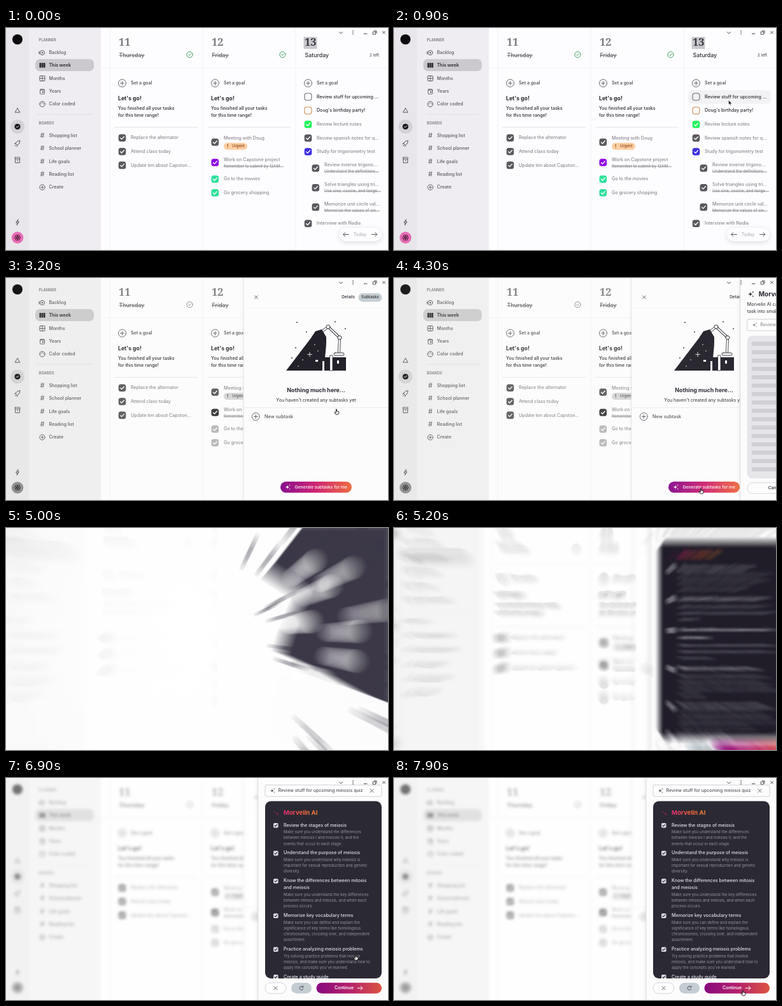
An HTML page with a canvas for the animation above (8 s loop, 600 by 350 pixels).

```html
<!DOCTYPE html>
<html lang="en">
<head>
<meta charset="utf-8">
<title>Weekly planner</title>
<style>
html, body { margin: 0; width: 100%; height: 100%; overflow: hidden; background: #fff; }
canvas { display: block; }
</style>
</head>
<body>
<canvas id="view" width="600" height="350"></canvas>
<script>
const W = 600, H = 350, LOOP = 8000;
const SANS = 'Inter, sans-serif', SERIF = '"Noto Serif", serif';
const INK = '#2b2930', SOFT = '#57555c', DONE = '#89878e', FAINT = '#f2f1f5';
const BRAND = 'Morvelin AI', TASK = 'Review stuff for upcoming meiosis quiz';

const view = document.getElementById('view').getContext('2d');
const layer = () => Object.assign(document.createElement('canvas'), { width: W, height: H }).getContext('2d');
const page = layer(), back = layer(), scene = layer(), soft = layer();
let c = page; // context being drawn on

const seg = (t, start, length) => Math.min(1, Math.max(0, (t - start) / length));
const easeOut = u => 1 - (1 - u) ** 3;
const easeBoth = u => u * u * (3 - 2 * u);
const random = i => Math.abs(Math.sin(i * 78.233) * 43758.5453) % 1;

// ---------- drawing helpers ----------
function text(s, x, y, size = 7.1, color = INK, weight = 500, font = SANS, align = 'left') {
  c.font = `${weight} ${size}px ${font}`;
  c.fillStyle = color;
  c.textAlign = align;
  c.textBaseline = 'middle';
  c.fillText(s, x, y);
  return c.measureText(s).width;
}
const centered = (s, x, y, size, color, weight) => text(s, x, y, size, color, weight, SANS, 'center');

function paint(fill, stroke, width = 1) {
  if (fill) { c.fillStyle = fill; c.fill(); }
  if (stroke) { c.strokeStyle = stroke; c.lineWidth = width; c.stroke(); }
}
function box(x, y, w, h, r, fill, stroke, width) {
  c.beginPath();
  c.roundRect(x, y, w, h, r);
  paint(fill, stroke, width);
}
function dot(x, y, r, fill, stroke, width) {
  c.beginPath();
  c.arc(x, y, r, 0, 7);
  paint(fill, stroke, width);
}
function trace(pts) {
  c.beginPath();
  for (let i = 0; i < pts.length; i += 2) c.lineTo(pts[i], pts[i + 1]);
}
function line(color, width, ...pts) {
  trace(pts);
  c.lineCap = c.lineJoin = 'round';
  paint(null, color, width);
}
function shape(fill, ...pts) {
  trace(pts);
  c.closePath();
  paint(fill);
}
function struck(s, x, y, size, color) {
  const w = text(s, x, y, size, color);
  line(color, .7, x, y + .4, x + w, y + .4);
}
function fade(x0, x1, ...colors) {
  const g = c.createLinearGradient(x0, 0, x1, 0);
  colors.forEach((k, i) => g.addColorStop(i / (colors.length - 1), k));
  return g;
}
function at(x, y, draw) {
  c.save();
  c.translate(x, y);
  draw();
  c.restore();
}

// ---------- icons ----------
function cross(x, y, r = 2.5, color = SOFT) {
  line(color, .9, x - r, y - r, x + r, y + r);
  line(color, .9, x - r, y + r, x + r, y - r);
}
function plus(x, y, r = 6) {
  dot(x, y, r, null, SOFT, .9);
  line(SOFT, .9, x - r / 2, y, x + r / 2, y);
  line(SOFT, .9, x, y - r / 2, x, y + r / 2);
}
function tick(x, y, k, color, width = 1.3) {
  line(color, width, x - 2.8 * k, y + .2 * k, x - .8 * k, y + 2.2 * k, x + 3 * k, y - 2 * k);
}
function check(x, y, color) {
  box(x - 5.8, y - 5.8, 11.6, 11.6, 3.5, color);
  tick(x, y, 1, '#fff');
}
function arrow(x, y, r, dir, color) {
  line(color, 1, x - r, y, x + r, y);
  line(color, 1, x + dir * (r - 3), y - 3, x + dir * r, y, x + dir * (r - 3), y + 3);
}
function spark(x, y, r, color) {
  for (const [dx, dy, k] of [[0, 0, r], [r, -r * .8, r * .4], [r, r * .8, r * .4]]) {
    c.beginPath();
    c.moveTo(x + dx, y + dy - k);
    for (let i = 1; i < 5; i++) {
      const a = i * Math.PI / 2;
      c.quadraticCurveTo(x + dx, y + dy, x + dx + k * Math.sin(a), y + dy - k * Math.cos(a));
    }
    paint(color);
  }
}
function calendar(x, y) {
  box(x - 3.5, y - 3.5, 7, 7.5, 1, null, SOFT, .9);
  line(SOFT, 1.2, x - 3, y - 2, x + 3, y - 2);
  box(x, y, 2, 2, 0, SOFT);
}

// ---------- planner page ----------
function rail() {
  box(0, 0, 36, H, 0, '#e8e6ea');
  dot(18, 18, 8, '#0b0a0d');
  dot(18, 155.5, 11, '#d3d1d6');
  line(SOFT, 1, 18, 126.5, 22, 133, 14, 133, 18, 126.5);
  dot(18, 155.5, 4.6, '#18171a');
  tick(18, 155.5, .65, '#fff', 1);
  line(SOFT, 1, 15, 182, 18, 178.5, 22, 177.5, 21, 182, 17.5, 185, 15, 182);
  line(SOFT, 1, 15, 181, 13.5, 183);
  line(SOFT, 1, 18, 185, 17, 187);
  line(SOFT, 1, 14, 186, 15.5, 184.5);
  box(14, 204, 8, 2.5, .5, null, SOFT, 1);
  box(14.5, 206.5, 7, 6, .5, null, SOFT, 1);
  line(SOFT, 1, 17, 209, 19, 209);
  line(SOFT, 1, 19, 302, 15.5, 307, 18, 307, 17, 311, 20.5, 305.5, 18, 305.5, 19, 302);
  dot(18, 330.5, 9.3, '#e76cb4');
  for (let i = 0; i < 6; i++)
    dot(18 + 3 * Math.cos(i * Math.PI / 3), 330.5 + 3 * Math.sin(i * Math.PI / 3), 1.6, null, '#4a1835', .9);
  dot(18, 330.5, 1.2, null, '#4a1835', .8);
}
function sidebar() {
  box(36, 0, 113, H, 0, '#efedf1');
  box(46, 49, 92, 19, 7, '#cbc9ce');
  line('#dfdde2', 1, 50, 136, 134, 136);
  text('PLANNER', 51.5, 19, 5.8, '#7b7980', 600);
  text('BOARDS', 51.5, 150, 5.8, '#7b7980', 600);
  ['Backlog', 'This week', 'Months', 'Years', 'Color coded'].forEach((s, i) =>
    text(s, 67.5, 39 + i * 20.3, 7, i == 1 ? INK : SOFT, i == 1 ? 600 : 500));
  ['Shopping list', 'School planner', 'Life goals', 'Reading list', 'Create'].forEach((s, i) => {
    text(s, 67.5, 170 + i * 20.3, 7.1, SOFT);
    if (i < 4) centered('#', 57, 170 + i * 20.3, 10.5, SOFT, 400);
  });
  dot(57, 39, 3.6, null, SOFT, 1);
  dot(57, 39, 1.2, SOFT);
  line(SOFT, 1, 52, 37, 52, 41);
  for (let i = 0; i < 3; i++) box(52.5 + i * 3.2, 55, 2.7, 7.5, .6, INK);
  box(53, 75.5, 8, 8, 1, null, SOFT, 1);
  line(SOFT, .9, 53, 79.5, 61, 79.5);
  line(SOFT, .9, 57, 75.5, 57, 83.5);
  calendar(57, 100);
  dot(57, 120, 4.2, null, SOFT, 1);
  for (const [x, y] of [[55, 119.5], [57, 117.8], [59, 119.5]]) dot(x, y, .7, SOFT);
  plus(57, 251.2, 4.2);
}
function dayHead(x, date, day) {
  text(date, x, 23, 16.5, '#7b7980', 700, SERIF);
  struck(day, x + .5, 43, 8.8, '#5f5d64');
  dot(x + 111.5, 42, 4.6, null, '#3f9d62', 1);
  tick(x + 111.5, 42, .65, '#3f9d62', 1);
}
function allDone(x) {
  text("Let's go!", x, 111, 8.7, INK, 700);
  text('You finished all your tasks', x, 127, 7.1);
  text('for this time range!', x, 138, 7.1);
  line('#e6e4e9', 1, x - 6, 156.5, x + 125, 156.5);
}
function planner(hover) {
  c = page;
  box(0, 0, W, H, 0, '#fdfcfe');
  rail();
  sidebar();
  for (const x of [163, 309, 455]) line(FAINT, 1, x, 0, x, H);
  line(FAINT, 1, 149, 63, W, 63);
  dayHead(177, '11', 'Thursday');
  dayHead(323, '12', 'Friday');
  box(467.5, 14, 21, 19, 1, '#c9c8cc');
  text('13', 469, 23, 16.5, '#3a3840', 700, SERIF);
  text('Saturday', 469.5, 43, 8.8);
  text('2 left', 571, 43, 6.3, SOFT);
  for (const x of [182.5, 328.5, 474.5]) {
    plus(x, 87);
    text('Set a goal', x + 13.5, 87, 7, SOFT, 600);
  }
  allDone(176);
  allDone(322);

  ['Replace the alternator', 'Attend class today', 'Update tim about Capston...'].forEach((s, i) => {
    check(182.5, 173.2 + i * 21.6, '#5a585e');
    text(s, 196, 173.2 + i * 21.6, 7.1, DONE);
  });

  check(328.3, 180, '#5a585e');
  text('Meeting with Doug', 342, 173.5, 7.1, DONE);
  box(342, 181, 37, 11, 5.5, '#fdcfa4');
  text('!', 347, 186.5, 7, '#8a4410', 700);
  text('Urgent', 355, 186.5, 6.1, '#8a4410');
  check(328.3, 212, '#9106e6');
  text('Work on Capstone project', 342, 208, 7.1, DONE);
  struck('Remember to submit by 12AM...', 342, 217.8, 6.2, DONE);
  check(328.3, 238.3, '#2fe09b');
  text('Go to the movies', 342, 238.3, 7.1, DONE);
  check(328.3, 259.8, '#2fe09b');
  text('Go grocery shopping', 342, 259.8, 7.1, DONE);

  c.globalAlpha = hover;
  box(462, 98, 130, 21.5, 6, '#f2f1f4');
  c.globalAlpha = 1;
  box(469, 103, 11, 11, 3.5, null, '#6b6970', 1.1);
  text('Review stuff for upcoming ...', 488, 108.5, 7.1);
  box(469, 124.7, 11, 11, 3.5, null, '#d08a4e', 1.1);
  text("Doug's birthday party!", 488, 130, 7.1);
  [['Review lecture notes', 152, '#1df45c'], ['Review spanish notes for q...', 173.5, '#5a585e'],
   ['Study for trigonometry test', 195, '#3c30e2'], ['Interview with Nadia', 308.3, '#5a585e']].forEach(([s, y, k]) => {
    check(474.5, y, k);
    text(s, 488, y, 7.1, DONE);
  });
  [['Review inverse trigono...', 'Understand the definitions...'], ['Solve triangles using tri...', 'Use sine, cosine, and tange...'],
   ['Memorize unit circle val...', 'Memorize the values of sin...']].forEach(([s, note], i) => {
    const y = 221 + i * 30.7;
    check(486.3, y, '#5a585e');
    text(s, 500, y - 4.7, 7.1, DONE);
    struck(note, 500, y + 5.3, 6.3, DONE);
  });

  c.shadowColor = '#0002';
  c.shadowBlur = 8;
  c.shadowOffsetY = 2;
  box(523, 315, 67, 21, 10.5, '#fdfcfe');
  c.shadowColor = 'transparent';
  arrow(534, 325.5, 4.3, -1, SOFT);
  arrow(578.5, 325.5, 4.3, 1, SOFT);
  centered('Today', 556, 325.5, 7, '#b5b3b9');
}

// ---------- task drawer ----------
function details() {
  ['Review stuff for ', 'upcoming meiosis ', 'quiz'].forEach((s, i) => {
    const y = 75 + i * 26.6, w = text(s, 388, y, 17.6, '#3a383f', 600, SERIF);
    line('#3a383f', 1.3, 388, y + 7, 388 + w, y + 7);
  });
  ['#f0982f', '#d6324e', '#7b6664', '#c9155f', '#8b14c8', '#4458d8', '#1fc98a', '#58df6b', '#e3e2e6'].forEach((k, i) => {
    dot(392.5 + i * 10.9, 147.3, 4.4, k, i == 8 ? '#8d8b92' : '#0002', .8);
    if (i == 6) dot(392.5 + i * 10.9, 147.3, 2.4, null, '#0a5c3e', .8);
    if (i == 8) dot(479.7, 147.3, 1.8, null, '#8d8b92', .8);
  });
  box(387.5, 163.5, 199, 24, 8, '#e8e7ea');
  text('Click to add description', 395, 175.5, 7.1, '#929097', 400);
  box(387.5, 196, 199, 25, 8, '#e8e7ea');
  calendar(400, 208.3);
  text('Saturday, May 13, 2023, 5:09 PM', 409.5, 208.3, 7);
  cross(571.5, 208.3);
  box(387.5, 228.5, 199, 105.5, 8, '#e8e7ea');
  ['Incomplete', 'Unpinned', 'Delete', 'Reschedule'].forEach((s, i) => {
    const y = 243 + i * 25.5, x = 403.7;
    dot(x, y, 9, '#ecebee', '#cfced3', .8);
    text(s, 420.5, y, 7.1, '#434148');
    if (i == 0) cross(x, y, 2.7, INK);
    if (i == 1) {
      box(x - 1.6, y - 4, 3.2, 4.5, .5, null, INK, 1);
      line(INK, 1, x - 3, y + .7, x + 3, y + .7);
      line(INK, 1, x, y + 1, x, y + 4);
    }
    if (i == 2) {
      box(x - 2.7, y - 2.2, 5.4, 6, .8, null, INK, 1);
      line(INK, 1, x - 3.5, y - 3.5, x + 3.5, y - 3.5);
      line(INK, .8, x - 1, y - .5, x - 1, y + 2);
      line(INK, .8, x + 1, y - .5, x + 1, y + 2);
    }
    if (i == 3) {
      dot(x, y, 4.2, null, INK, 1);
      line(INK, 1, x, y - 2.4, x, y, x + 1.6, y + 1.4);
    }
  });
  box(387.5, 345, 101, 16, 7, '#dfdee2');
  text('Created a few minutes ago', 394, 352.3, 6.6, SOFT);
}
function lamp() {
  const dark = '#232129';
  shape(dark, 440, 146, 481, 92, 503, 105, 501, 126, 481, 146);
  box(481, 125, 53, 21, 0, dark);
  box(497, 131, 3, 15, 0, '#fff');
  box(509, 122, 4, 24, 0, '#fff', dark, .8);
  box(486, 129, 4, 3, 0, '#fff');
  box(520, 130, 3, 5, 0, '#fff');
  for (const [k, w] of [[dark, 4], ['#fff', 2.4]]) line(k, w, 489, 90, 506, 77, 524, 94, 523, 119);
  shape(dark, 480, 93, 486, 84, 496, 81, 503, 93, 503, 105);
  for (const [x, y] of [[506, 77], [524, 94]]) dot(x, y, 3, '#fff', dark, .9);
  box(515, 118, 16, 4, 2, '#fff', dark, .9);
  for (const [x, y] of [[457, 70], [472, 85], [517, 69], [455, 110], [533, 80], [449, 126]]) dot(x, y, .9, dark);
  for (const [x, y] of [[485, 105], [466, 129], [459, 139], [490, 115]]) dot(x, y, .8, '#fff');
  line('#fff', .8, 477, 117, 477, 124);
  line('#fff', .8, 473.5, 120.5, 480.5, 120.5);
}
function subtasks() {
  lamp();
  centered('Nothing much here...', 487, 177, 8.9, INK, 700);
  centered("You haven't created any subtasks yet", 487, 192.5, 7.1, INK, 400);
  line('#ebeaee', 1, 373, 204.5, W, 204.5);
  plus(392.3, 218.5);
  text('New subtask', 406, 218.5, 7.3, SOFT);
  box(431, 321, 112, 17.5, 8.7, fade(431, 543, '#870f8e', '#cf2673', '#ee6c3f'));
  spark(442, 329.7, 3.6, '#fff');
  text('Generate subtasks for me', 453.5, 329.8, 6.7, '#fff');
}
function taskDrawer(t) {
  const tab = seg(t, 2850, 150);
  c.shadowColor = '#0001';
  c.shadowBlur = 6;
  box(373, 0, 240, H, 0, '#fdfcfd');
  c.shadowColor = 'transparent';
  line('#e3e2e6', 1, 373, 0, 373, H);
  cross(393, 30.3);
  if (tab) box(553.5, 24, 37, 13.5, 6.7, '#c6cfd3');
  else box(523, 24, 29, 13.5, 6.7, '#c6cfd3');
  centered('Details', 537.5, 30.5, 6.3, INK, 500);
  centered('Subtasks', 572, 30.5, 6.3, INK, 500);
  line('#f3f2f5', 1, 373, 47.5, W, 47.5);
  c.globalAlpha = tab || 1;
  if (tab) subtasks(); else details();
  c.globalAlpha = 1;
}

// ---------- assistant drawer ----------
const STEPS = [
  [74.5, ['Review the stages of meiosis'], ['Make sure you understand the differences', 'between meiosis I and meiosis II, and the', 'events that occur in each stage.']],
  [118.3, ['Understand the purpose of meiosis'], ['Make sure you understand why meiosis is', 'important for sexual reproduction and genetic', 'diversity.']],
  [162.2, ['Know the differences between mitosis', 'and meiosis'], ['Make sure you understand the key differences', 'between mitosis and meiosis, and when each', 'process occurs.']],
  [217, ['Memorize key vocabulary terms'], ['Make sure you can define and explain the', 'significance of key terms like homologous', 'chromosomes, crossing over, and independent', 'assortment.']],
  [270, ['Practice analyzing meiosis problems'], ['Try solving practice problems that involve', 'meiosis, and make sure you understand how to', "apply the concepts you've learned."]],
  [313.6, ['Create a study guide'], []],
];
function field(y, color) {
  box(407, y - 9, 183, 18, 2, '#fefefe', '#cfced3', 1);
  spark(418, y, 3.5, color);
  text(TASK, 427.5, y + .2, 7.1, color);
  cross(574.5, y, 2.7);
}
function loading() {
  spark(412, 25.5, 4.2, INK);
  text(BRAND, 425, 25.5, 10, INK, 700);
  text(BRAND + ' can help you break down your', 407, 42, 7.1, INK, 400);
  text('task into smaller, easier subtasks', 407, 52.5, 7.1, INK, 400);
  field(74, '#929097');
  box(407, 91, 183, 225, 8, '#e6e5e9');
  for (let i = 0; i < 16; i++) box(414, 100.5 + i * 13.2, 169, 6.5, 2, '#d0cfd4');
  box(407, 322.8, 88, 17, 8.5, null, '#d3d2d7', 1);
  centered('Cancel', 451, 331.3, 6.7);
  box(502, 322.8, 88, 17, 8.5, '#dddce0');
  centered('Generate', 546, 331.3, 6.7, '#a3a1a8');
}
function answer() {
  field(20, SOFT);
  c.save();
  box(407, 36.5, 183, 279.5, 9, '#2b2933');
  c.clip();
  line('#a0255e', 1, 421, 52.5, 427, 58.5, 427, 54.5);
  text(BRAND, 436, 55.5, 9.6, fade(436, 492, '#e22b76', '#f0603c', '#f0862f'), 700);
  for (const [y, title, notes] of STEPS) {
    box(420, y - 3.5, 7.6, 7.6, 1.8, '#dcdae2');
    tick(423.8, y + .2, .7, '#2b2933', 1.1);
    title.forEach((s, i) => text(s, 436, y + i * 10.8, 7.15, '#e6e4eb'));
    const top = y + title.length * 10.8;
    notes.forEach((s, i) => text(s, 436, top + i * 9.2, 6.1, '#9794a0', 400));
  }
  c.restore();
  box(407, 322.8, 33, 17, 8.5, '#fefefe', '#d3d2d7', 1);
  cross(423.5, 331.3, 2.7);
  box(448, 322.8, 32, 17, 8.5, '#c3cdd2');
  c.beginPath();
  c.arc(464, 331.3, 3, .4, 5.4);
  paint(null, SOFT, 1);
  line(SOFT, 1, 466.8, 327.5, 466.8, 330, 464.3, 330);
  box(487.5, 322.8, 102.5, 17, 8.5, fade(487, 590, '#860a80', '#b31f6c', '#dc5440'));
  centered('Continue', 531, 331.4, 6.9, '#fff', 600);
  arrow(556, 331.3, 4, 1, '#fff');
}
function assistant(t) {
  c.shadowColor = '#0002';
  c.shadowBlur = 6;
  box(396, 0, 220, H, 0, '#fdfcfd');
  c.shadowColor = 'transparent';
  line('#dddce0', 1, 396, 0, 396, H);
  if (t < 4950) loading(); else answer();
}

// ---------- window buttons and pointer ----------
function windowButtons() {
  line('#444', 1, 523.5, 6.3, 526, 8.8, 528.5, 6.3);
  for (const y of [4.5, 7, 9.5]) dot(545, y, .8, '#444');
  line('#444', 1, 562, 9, 567, 9);
  box(576.5, 6, 4, 4, 0, null, '#444', .9);
  line('#444', .9, 578, 4.5, 582, 4.5, 582, 8.5);
  cross(593.5, 7, 2, '#444');
}
const MOVES = [[100, 400, 335], [800, 526, 114], [1950, 526, 114], [2150, 528, 108], [2250, 528, 108], [2700, 571, 30],
  [2950, 571, 30], [3400, 482, 332], [5700, 482, 332], [6200, 549, 279], [7400, 549, 279], [7850, 548, 335]];
function pointer(t) {
  if (t < 100) return;
  const i = MOVES.findLastIndex(m => m[0] <= t);
  const a = MOVES[i], b = MOVES[i + 1] || a;
  const u = easeBoth(seg(t, a[0], b[0] - a[0] || 1));
  at(a[1] + (b[1] - a[1]) * u, a[2] + (b[2] - a[2]) * u, () => {
    if (t > 1600 && t < 2400) {
      line('#555', .8, -1.5, -3.5, 0, -3, 1.5, -3.5);
      line('#555', .8, 0, -3, 0, 3);
      line('#555', .8, -1.5, 3.5, 0, 3, 1.5, 3.5);
    } else if (t > 2550) {
      trace([-.8, 0, .6, 0, .8, 3, 4, 3.6, 4, 6, 3, 8, -.8, 8, -3, 4.8, -2, 4.2, -.8, 5.2]);
      c.closePath();
      paint('#fff', '#1a1a1a', .9);
    } else {
      trace([-.5, 0, -.5, 7, 1.2, 5.6, 2.3, 8, 3.5, 7.4, 2.5, 5.2, 4.6, 5]);
      c.closePath();
      paint('#111', '#fff', .6);
    }
  });
}

// ---------- composition ----------
// Sharp copy first keeps the blurred copy opaque along the borders.
function copy(target, from, filter) {
  target.filter = 'none';
  target.drawImage(from.canvas, 0, 0);
  if (filter) {
    target.filter = filter;
    target.drawImage(from.canvas, 0, 0);
    target.filter = 'none';
  }
}
function wash(alpha) {
  box(0, 0, W, H, 0, `rgba(255,255,255,${alpha})`);
}
function compose(t) {
  const first = easeOut(seg(t, 1100, 550)), second = easeOut(seg(t, 4250, 500));
  planner(seg(t, 750, 150));
  c = back;
  copy(back, page, first && `grayscale(${first}) blur(${.5 * first}px)`);
  if (first) {
    wash(.05 * first);
    at(227 * (1 - first), 0, () => taskDrawer(t));
  }
  c = scene;
  copy(scene, back, second && `blur(${1.9 * second ** 2}px)`);
  if (second) {
    wash(.4 * second ** 2);
    at(204 * (1 - second), 0, () => assistant(t));
  }
  windowButtons();
  pointer(t);
}

// ---------- zoom burst ----------
const CX = 318, CY = 172;
// Dark fan, flying slivers and light discs around the centre of the zoom.
function shatter(alpha) {
  c = soft;
  c.globalAlpha = alpha;
  box(330, 0, 270, H, 0, '#fdfdfd');
  const glow = c.createRadialGradient(290, CY, 30, 290, CY, 300);
  glow.addColorStop(0, '#fff');
  glow.addColorStop(1, '#fff6');
  box(0, 0, W, H, 0, glow);
  at(CX, CY, () => {
    c.scale(.77, .77);
    shape('#454250', 125, -8, 150, -70, 95, -105, 165, -195, 320, -195, 320, 118, 235, 85, 175, 52, 115, 25);
    for (let i = 0; i < 46; i++) {
      const a = -1.2 + 2.1 * random(i + 1), r = 85 + 230 * random(i + 60);
      c.save();
      c.rotate(a);
      box(r, 0, 10 + r * .12, 3 + r * .03, 1, a > .3 ? '#6b687380' : '#45425099');
      c.restore();
    }
    for (const [x, y] of [[150, -108], [203, -98], [172, -72], [250, -38], [212, -8], [208, 34], [145, -22], [165, 62]])
      dot(x, y, 17, '#fffd');
  });
  c.globalAlpha = 1;
}
// Radial blur: the average of many enlarged copies.
function burst(k, opened) {
  const N = 28;
  copy(soft, scene, `blur(${2.5 * k}px)`);
  if (opened && k > .6) shatter((k - .6) / .4);
  for (let i = 0; i < N; i++) {
    const s = 1 + k * (.12 + .36 * i / N);
    view.globalAlpha = 1 / (i + 1);
    view.setTransform(s, 0, 0, s, CX * (1 - s), CY * (1 - s));
    view.drawImage(soft.canvas, 0, 0);
  }
  view.resetTransform();
  view.globalAlpha = 1;
}
function frame(now) {
  const t = now % LOOP, opened = t >= 4950;
  compose(t);
  const k = opened ? (1 - seg(t, 5000, 700)) ** 3 : .7 * seg(t, 4830, 120) ** 2;
  if (k > 0) burst(k, opened); else copy(view, scene);
  requestAnimationFrame(frame);
}
requestAnimationFrame(frame);
</script>
</body>
</html>
```
